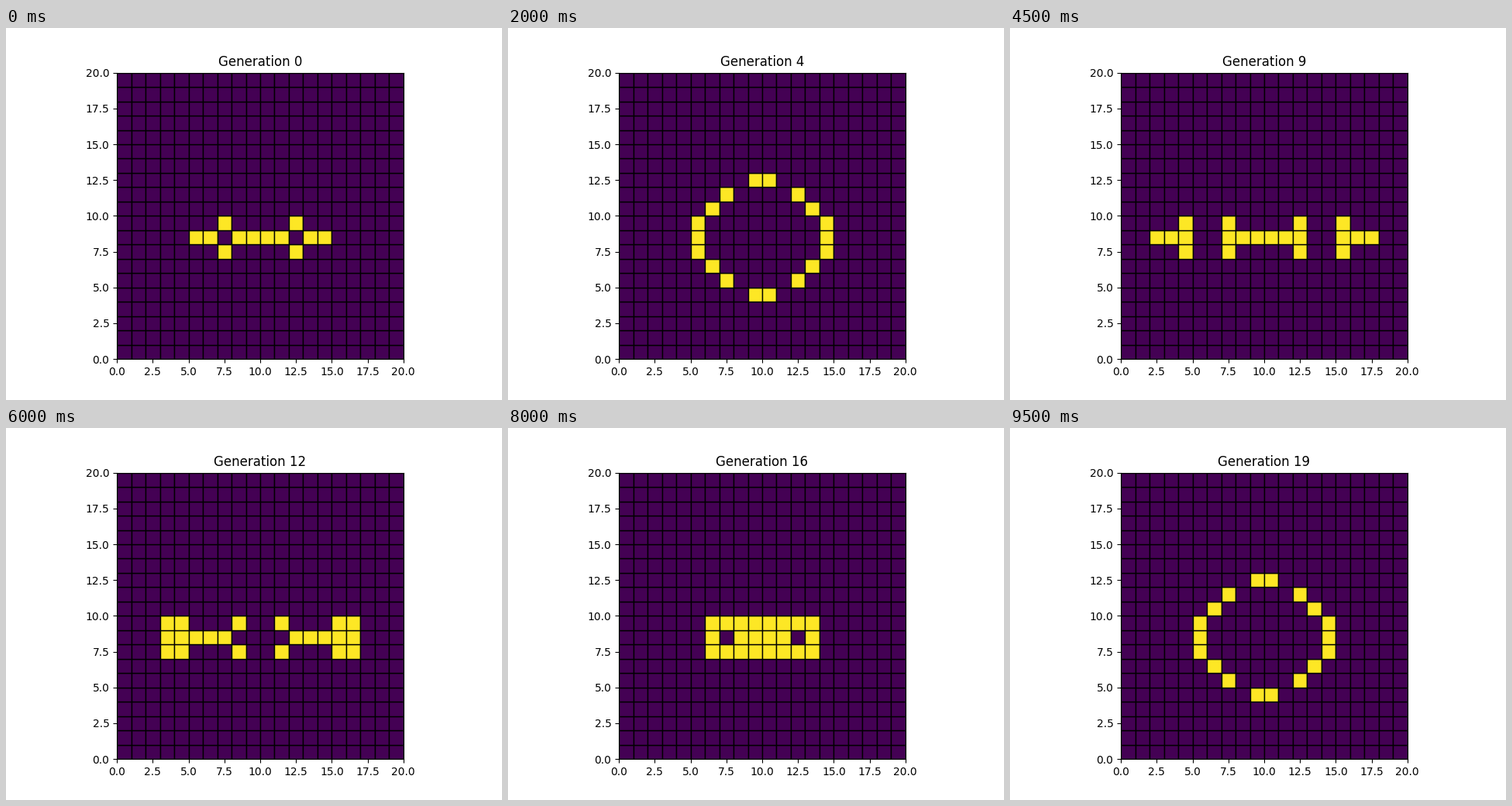
These frames come from a looping animation (640x480 px, 10000 ms). A matplotlib script:

```python
import numpy as np
import matplotlib.pyplot as plt
from matplotlib.animation import FuncAnimation

SIZE = 20
GENERATIONS = 20
INTERVAL = 500

plt.rcParams["text.kerning_factor"] = 6


def first_grid():
    grid = np.zeros((SIZE, SIZE), dtype=int)
    grid[8, 5:15] = 1
    for col in (7, 12):
        grid[7:10, col] = (1, 0, 1)
    return grid


def step(grid):
    neighbours = sum(
        np.roll(grid, (dy, dx), axis=(0, 1))
        for dy in (-1, 0, 1)
        for dx in (-1, 0, 1)
        if (dy, dx) != (0, 0)
    )
    return ((neighbours == 3) | ((grid == 1) & (neighbours == 2))).astype(int)


history = [first_grid()]
while len(history) < GENERATIONS:
    history.append(step(history[-1]))

fig, ax = plt.subplots(figsize=(6.4, 4.8), dpi=100)
ax.set_aspect("equal")
mesh = ax.pcolormesh(history[0], cmap="viridis", vmin=0, vmax=1,
                     edgecolors="k", linewidth=1, antialiased=True)
title = ax.set_title("Generation 0")


def update(generation):
    mesh.set_array(history[generation])
    title.set_text(f"Generation {generation}")
    return mesh, title


animation = FuncAnimation(fig, update, frames=GENERATIONS, interval=INTERVAL,
                          repeat=True, repeat_delay=0)
plt.show()
```
